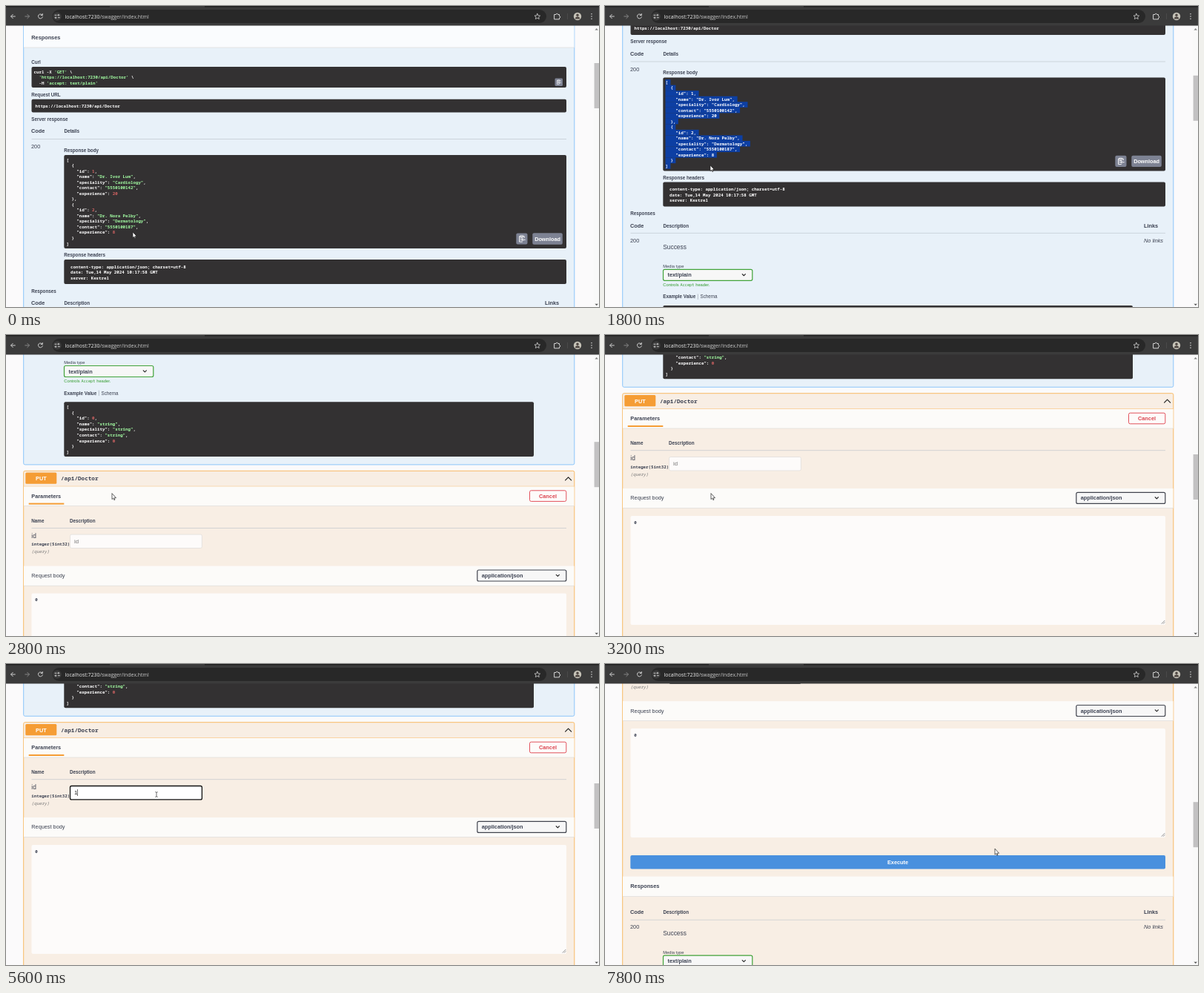
An HTML page that plays this animation: 800x406 px, repeating every 8000 ms.

```html
<!DOCTYPE html>
<html lang="en">
<head>
<meta charset="utf-8">
<title>API explorer</title>
<style>
  html, body { margin: 0; width: 100%; height: 100%; overflow: hidden; background: #fbfafb; }
  svg { display: block; width: 100vw; height: 100vh; }
  text { font-family: "Liberation Sans", Arial, sans-serif; white-space: pre; }
  .mono { font-family: "Noto Sans Mono", "DejaVu Sans Mono", monospace; }
  .url { font-family: "Open Sans", "Noto Sans", sans-serif; }
</style>
</head>
<body>
<svg id="stage" viewBox="0 0 800 406"></svg>
<script>
const INK = '#3b4151', DARK = '#333132', SLATE = '#7d8293';
const GET = '#8cc5fa', GET_BG = '#e8f1f9', PUT = '#f8ba66', PUT_BG = '#f8eee4';
const SMALL = 6.27, BASE = 7.32, LARGE = 8.36, MONO = 5.78, CHAR = 3.468, LINE = 7.53;

const rect = (x1, y1, x2, y2, fill, extra = '') =>
  `<rect x="${x1}" y="${y1}" width="${x2 - x1}" height="${y2 - y1}" fill="${fill}" ${extra}/>`;
const box = (x1, y1, x2, y2, fill, stroke, width = 1, r = 2) =>
  rect(x1, y1, x2, y2, fill, `rx="${r}" stroke="${stroke}" stroke-width="${width}"`);
const path = (d, stroke, width = 1, fill = 'none') =>
  `<path d="${d}" fill="${fill}" stroke="${stroke}" stroke-width="${width}" stroke-linecap="round" stroke-linejoin="round"/>`;
const rule = (y, x1 = 34.5, x2 = 756, color = '#b9c0c8') => rect(x1, y - .3, x2, y + .3, color);

// y is the vertical middle of the capitals
const text = (x, y, s, size = BASE, fill = INK, extra = '') =>
  `<text x="${x}" y="${(y + size * .358).toFixed(2)}" font-size="${size}" fill="${fill}" ${extra}>${s}</text>`;
const bold = (x, y, s, size = BASE, fill = INK, extra = '') =>
  text(x, y, s, size, fill, `font-weight="700" ${extra}`);
const mid = (x, y, s, fill) => bold(x, y, s, BASE, fill, 'text-anchor="middle"');
const mono = (x, y, s, fill = '#fff', size = MONO) => bold(x, y, s, size, fill, 'class="mono"');

const paint = line => line.replace(/'[^']*'|(?<=": )"[^"]*"|(?<=": )\d+/g, s =>
  `<tspan fill="${/\d/.test(s[0]) ? '#d36363' : '#a2fca2'}">${s}</tspan>`);
const code = (x, y, lines) => lines.map((s, i) => mono(x, y + i * LINE, paint(s))).join('');
const panel = (x1, y1, x2, y2) => rect(x1, y1, x2, y2, DARK, 'rx="2"');
const chevron = (x, y, w, dir, width) => path(`M${x - w} ${y - dir * w / 2}l${w} ${dir * w}l${w} ${-dir * w}`, '#222', width);

const copyIcon = (x, y, s) => `<g transform="translate(${x} ${y}) scale(${s / 15})">` +
  rect(0, 0, 15, 15, SLATE, 'rx="2"') +
  path('M5 4.2H4.2V11.5H8M10 4.2h.8V6M5.8 3.4h3.4v1.6H5.8zM11.8 8.8H7.4M8.8 7.4L7.4 8.8l1.4 1.4M5.6 6.6h3M5.6 8.8h.8', '#fff', .9) + '</g>';

const select = (x1, y1, x2, label, stroke, fill = '#f7f7f7') =>
  box(x1, y1, x2, y1 + 15, fill, stroke, 1.2) + bold(x1 + 6, y1 + 7.4, label) +
  chevron(x2 - 11.5, y1 + 7.4, 2.1, 1, 1.1);

const section = (y1, y2, fill) => rect(24, y1, 766.5, y2, fill) + rule(y2, 24, 766.5, '#d9d7d5');

const headRow = (y, first) => bold(34, y, 'Code') + bold(78.5, y + .5, first, SMALL);

const success = y => text(34, y, '200') + text(727, y, 'No links', BASE, INK, 'font-style="italic"') +
  text(78.3, y + 9, 'Success', LARGE) + text(78.3, y + 34.4, 'Media type', 5.75) +
  select(78.5, y + 38.9, 198.8, 'text/plain', '#41a33a') +
  text(78.3, y + 59.7, 'Controls', 5.75, '#2f9a2a') +
  text(101.5, y + 59.7, 'Accept', 5.25, '#2f9a2a', 'class="mono"') +
  text(122.2, y + 59.7, 'header.', 5.75, '#2f9a2a');

const record = (id, name, speciality, contact, experience) => [
  '  {', `    "id": ${id},`, `    "name": "${name}",`, `    "speciality": "${speciality}",`,
  `    "contact": "${contact}",`, `    "experience": ${experience}`, '  }'];
const doctors = ['[', ...record(1, 'Dr. Ivor Lum', 'Cardiology', '5550100142', 20), '  {',
  ...record(2, 'Dr. Nora Pelby', 'Dermatology', '5550100187', 8).slice(1), ']'];
doctors[7] += ',';
const sample = ['[', ...record(0, 'string', 'string', 'string', 0), ']'];

const marked = doctors.map((s, i) => {
  const y = 207.5 + i * LINE;
  return `<g class="mark">${rect(81.5, y - 3.8, 81.5 + (s.length + 1) * CHAR, y + 3.8, '#0d3fa3')}${mono(81.5, y, s)}</g>`;
}).join('');

const getBlock = () =>
  box(23.7, 10, 766.8, 593.3, GET_BG, GET) + section(20, 56, '#fafcfe') +
  bold(34.3, 42.6, 'Responses') + bold(34.3, 75.6, 'Curl', SMALL) +
  panel(34.5, 82, 756, 110) +
  code(37.5, 88.6, ["curl -X 'GET' \\", "  'https://localhost:7230/api/Doctor' \\", "  -H 'accept: text/plain'"]) +
  copyIcon(740.5, 97.5, 10.5) +
  bold(34.3, 119.5, 'Request URL', SMALL) + panel(34.5, 125.8, 756, 143.5) +
  mono(39.5, 134.6, 'https://localhost:7230/api/Doctor') +
  bold(34.3, 152.5, 'Server response', SMALL) + headRow(168.6, 'Details') + rule(179.6) +
  text(34, 189.5, '200') + bold(78.3, 194.3, 'Response body', SMALL) +
  panel(78.3, 201, 756, 327) + code(81.5, 207.5, doctors) + marked +
  copyIcon(688.3, 306.4, 15.2) + rect(710.3, 306.3, 750.8, 321.7, SLATE, 'rx="2"') + mid(730.6, 314, 'Download', '#fff') +
  bold(78.3, 336, 'Response headers', SMALL) + panel(78.3, 342, 756, 375) +
  code(87, 351.6, ['content-type: application/json; charset=utf-8', 'date: Tue,14 May 2024 10:17:58 GMT', 'server: Kestrel']) +
  bold(34.3, 384.3, 'Responses', SMALL) + headRow(400.6, 'Description') + bold(727, 400.6, 'Links') + rule(410.8) +
  success(421) + bold(78.3, 496.8, 'Example Value', SMALL) + rect(124.9, 493, 125.4, 500.5, '#8b919c') +
  text(128.5, 496.8, 'Schema', SMALL) + panel(78.3, 508.7, 712, 582.3) + code(81.5, 515.7, sample);

const putBlock = () =>
  box(23.7, 601.7, 766.8, 1180, PUT_BG, PUT) + rect(26.3, 604, 68.3, 619.2, '#f59d35', 'rx="1.5"') +
  mid(47.4, 612, 'PUT', '#fff') + mono(74, 612, '/api/Doctor', INK, 7.66) +
  `<g id="toggle">${chevron(758.6, 612.2, 4, -1, 1.2)}</g><g id="copy">${copyIcon(750.3, 605.3, 12)}</g>` +
  rule(622.5, 24, 766.5, PUT) + section(622.9, 649, '#fcfbf9') +
  bold(34.3, 635.3, 'Parameters') + rect(30.7, 645, 78.3, 647, '#f59d35') +
  box(706.5, 628.2, 755.8, 642.8, '#fdfbfa', '#e2515c') + mid(731, 635.4, 'Cancel', '#dc4450') +
  bold(34.3, 669, 'Name', SMALL) + bold(86, 669, 'Description', SMALL) + rule(678.8) +
  text(34.3, 689.4, 'id', LARGE) + mono(34.3, 700.6, 'integer($int32)', INK) +
  text(34.3, 710.6, '(query)', MONO, '#777', 'class="mono" font-style="italic"') +
  '<g id="field"></g>' +
  section(730, 756.6, '#fcfbf9') + text(34.3, 742.8, 'Request body') +
  select(635.8, 735.4, 755.8, 'application/json', '#41444e') +
  rect(34.5, 767, 756, 914, '#fdfbfa', 'rx="2"') + mono(39.3, 775.6, '0', INK) +
  path('M751 912.3l4-4M753.3 912.3l1.7-1.7', '#666', .7) +
  rect(34.3, 937.9, 756, 956.4, '#4990de', 'rx="2"') + mid(395, 947.1, 'Execute', '#fff') +
  section(966.5, 993.6, '#fcfbf9') + bold(34.3, 979.4, 'Responses') +
  headRow(1014, 'Description') + bold(727, 1014, 'Links') + rule(1025) + success(1034.2);

const dot = (x, y, r, fill) => `<circle cx="${x}" cy="${y}" r="${r}" fill="${fill}"/>`;
const toolbar = () =>
  rect(0, 0, 800, 26.5, '#3b3b3b') + rect(0, 0, 140, 1.5, '#202020') + rect(268, 0, 800, 1.5, '#202020') +
  rect(62.5, 5, 729, 23, '#282828', 'rx="9"') +
  path('M12.3 14H6.8M9.3 11.3L6.6 14l2.7 2.7', '#d0d0d0') +
  path('M25.8 14h5.5M28.8 11.3l2.7 2.7-2.7 2.7', '#858585') +
  path('M49 12.2A3 3 0 1 0 49.4 14.8M49.3 10.5V12.6H47.2', '#d0d0d0') +
  dot(69, 14, 5.8, '#3b3b3b') +
  path('M66 12.3h2M70.4 15.7h2', '#ddd', .9) + path('M70 12.3a.9.9 0 1 0 1.8 0a.9.9 0 1 0-1.8 0M66.2 15.7a.9.9 0 1 0 1.8 0a.9.9 0 1 0-1.8 0', '#ddd', .8) +
  text(79.6, 14.2, 'localhost:7230<tspan fill="#c9c9c9">/swagger/index.html</tspan>', 6.95, '#eee', 'class="url"') +
  path('M716.8 10.3l1.1 2.5 2.7.3-2 1.8.6 2.7-2.4-1.4-2.4 1.4.6-2.7-2-1.8 2.7-.3z', '#d0d0d0', .8) +
  path('M740 11.5h2.1a1.2 1.2 0 0 1 2.4 0h2v2.2a1.2 1.2 0 0 1 0 2.4v1.8h-6.5z', '#d5d5d5', 1) +
  rect(757, 10, 757.6, 18, '#555') +
  dot(771, 14, 5.2, '#c6c3b8') + dot(771, 12.3, 1.7, '#4d4540') + path('M768 17.2a3 2.6 0 0 1 6 0z', '#4d4540', .3, '#4d4540') +
  [10.8, 14, 17.2].map(y => dot(790, y, .8, '#d5d5d5')).join('');

const scrollbar = () =>
  rect(792.8, 26.5, 800, 406, '#f9f9f9') + path('M795 32.2l1.7-2 1.7 2z', '#777', .3, '#777') +
  path('M795 402l1.7 2 1.7-2z', '#555', .3, '#555') + rect(793.6, 0, 800, 61, '#c2c1c2', 'id="thumb"');

const cursors = {
  arrow: path('M0 0V7.6L1.7 6.1 2.9 8.6 4 8.1 2.9 5.7H5.1Z', '#222', .7, '#fff'),
  hand: path('M-.7.4Q0-.5.7.4V3.2L4 4.2Q4.8 4.5 4.6 5.6L3.9 9H-.3L-2.6 5.8Q-2.4 4.8-.7 6Z', '#222', .7, '#fff'),
  beam: path('M-1.3-3.4Q0-3.4 0-2.6V2.6Q0 3.4-1.3 3.4M1.3-3.4Q0-3.4 0-2.6M0 2.6Q0 3.4 1.3 3.4', '#333', .7)
};

const $ = id => document.getElementById(id);
$('stage').innerHTML = rect(0, 0, 800, 406, '#fbfafb') +
  `<g id="page">${getBlock()}${putBlock()}</g>` + scrollbar() + toolbar() + '<g id="cursor"></g>';
const marks = [...document.querySelectorAll('.mark')];

const scrollKeys = [[0, 0], [1200, 0], [1600, 104.6], [1800, 104.6], [2400, 313.8], [2800, 418.4], [3200, 523], [6800, 523], [7600, 679.9]];
const moveKeys = [[0, 171, 305], [200, 171, 305], [600, 88, 321], [1000, 82, 206], [1400, 142, 215], [1800, 142, 215],
  [2400, 143, 214], [3200, 143, 214], [4200, 691.5, 98.5], [5000, 203, 176], [6000, 203, 176], [7400, 526, 249.5]];

function track(keys, t, col = 1) {
  const i = keys.findIndex(k => k[0] > t);
  if (i < 0) return keys[keys.length - 1][col];
  const a = keys[i - 1], b = keys[i];
  return a[col] + (b[col] - a[col]) * (t - a[0]) / (b[0] - a[0]);
}

function field(t) {
  const focus = t >= 5000, typed = t >= 5400;
  return box(86.5, 687.5, 264.4, 705.9, focus ? '#fff' : '#fdfbfa', focus ? '#111' : '#dedbd8', focus ? 1.3 : .7) +
    text(92, 696.7, typed ? '1' : 'id', 7.8, typed ? '#222' : '#777') +
    (focus ? rect(typed ? 96.4 : 91.7, 692, typed ? 97 : 92.3, 701, '#111') : '');
}

function draw(time) {
  const t = Math.floor(time / 200) * 200;
  const scroll = track(scrollKeys, t), x = track(moveKeys, t), y = track(moveKeys, t, 2), py = y + scroll;
  $('page').setAttribute('transform', `translate(0 ${-scroll})`);
  $('thumb').setAttribute('y', 77 + scroll * .1606);

  const from = t >= 600 && t < 2000 ? Math.round(track([[600, 15], [1000, 0]], t)) : marks.length;
  marks.forEach((m, i) => m.setAttribute('display', i >= from ? 'inline' : 'none'));

  const header = py > 601.7 && py < 622.5 && x > 24 && x < 767;
  const input = x > 86 && x < 265 && py > 687 && py < 706;
  $('toggle').setAttribute('transform', `translate(${header ? -16.6 : 0} 0)`);
  $('copy').setAttribute('display', header ? 'inline' : 'none');
  $('field').innerHTML = field(t);
  $('cursor').innerHTML = cursors[header ? 'hand' : input ? 'beam' : 'arrow'];
  $('cursor').setAttribute('transform', `translate(${x} ${y})`);
}

const start = performance.now();
function tick() {
  draw((performance.now() - start) % 8000);
  requestAnimationFrame(tick);
}
tick();
</script>
</body>
</html>
```
